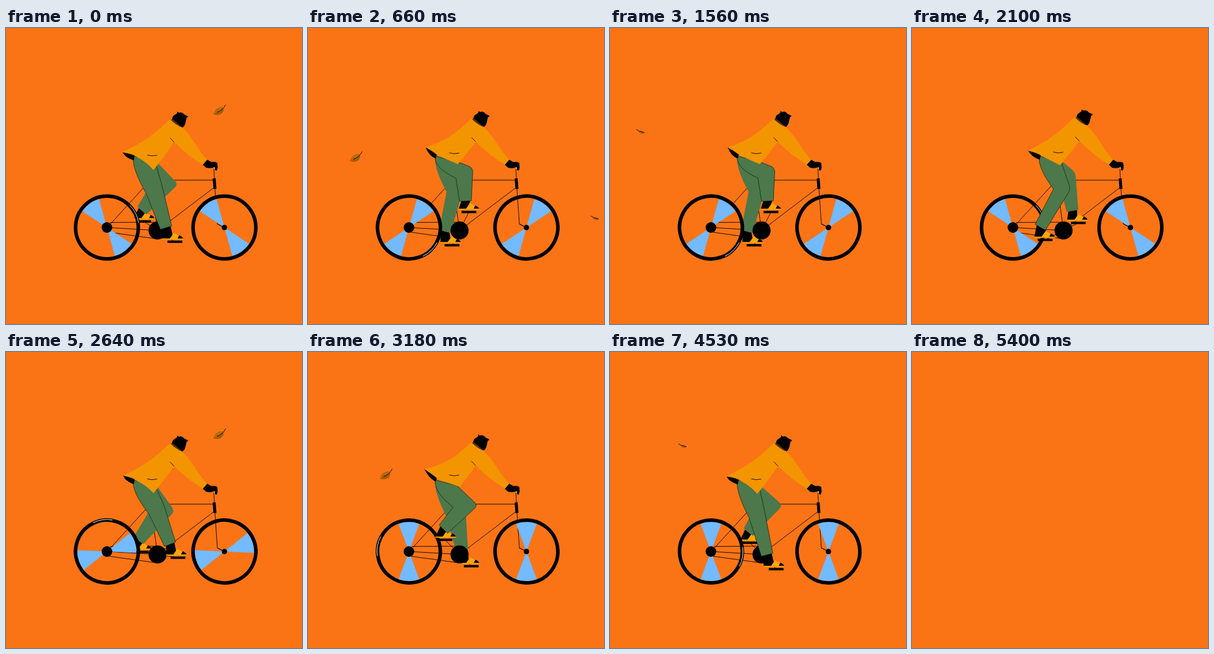
An HTML page that plays this animation: 500 by 500 pixels, repeating every 5430 ms.

```html
<!DOCTYPE html>
<html lang="en">
<head>
<meta charset="utf-8">
<title>Autumn ride</title>
<style>
  html, body { margin: 0; width: 100%; height: 100%; overflow: hidden; background: #fa7416; }
  svg { display: block; width: 100vw; height: 100vh; }
  .line { fill: none; stroke: #000; stroke-width: .9; }
  .pants { fill: #4c784b; }
  .near { stroke: #10180f; stroke-width: .7; }
  .jacket { fill: #f39500; }
  .shoe { fill: #fca50a; }
  .blue { fill: #73baff; }
</style>
</head>
<body>
<svg viewBox="0 0 500 500">
  <defs>
    <g id="wheel">
      <path class="blue" d="M0 0L41.7 27.6A50 50 0 0 1 13.4 48.2ZM0 0L-41.7 -27.6A50 50 0 0 1 -13.4 -48.2Z"/>
      <circle r="53" fill="none" stroke="#000" stroke-width="6"/>
    </g>
    <g id="foot">
      <path class="shoe" d="M-8 -5L-1 -15L8 -10L14 -5Z"/>
      <path d="M5 -5L8 -11Q13 -9 15 -5Z"/>
      <path class="shoe" d="M-20 -5.5H15V-3.5H-20Z"/>
    </g>
  </defs>

  <g id="scene">
    <g id="leafA">
      <path fill="#b96a04" d="M-11 6Q-7 -7 5 -6Q9 -1 3 5Q-3 9 -11 6Z"/>
      <path fill="#a45c00" d="M-11 6Q-1 3 6 -5Q8 0 3 5Q-3 9 -11 6Z"/>
      <path class="line" d="M-5 3Q5 0 10 -10"/>
    </g>
    <g id="leafB">
      <path fill="#b06205" d="M-4 0Q0 -4 7 2Q0 6 -4 0Z"/>
      <path class="line" d="M-7.5 -3.5Q-3 0 6 1.5"/>
    </g>

    <g class="line">
      <path d="M171 337L244 257H353M243 250L256 342L352 269"/>
      <path d="M176 328.5L250 328M171 337L256 342M174 345L250 355.5"/>
      <path d="M351 236L353 272L357 331L369 337"/>
      <path d="M351.6 254L353 272" stroke-width="5"/>
    </g>

    <g id="farLeg"></g>

    <g transform="translate(170.5 337)">
      <g class="spin">
        <use href="#wheel"/>
        <path d="M38.8 -37.5A54 54 0 0 1 53.5 -7.5" fill="none" stroke="#fff" stroke-width=".9"/>
      </g>
      <circle r="9"/>
    </g>
    <g transform="translate(369 337)">
      <g class="spin"><use href="#wheel"/></g>
      <path class="line" d="M-12 -6L0 0"/>
      <circle r="4.6"/>
    </g>
    <circle cx="256" cy="342" r="15.3"/>

    <g id="nearLeg"></g>

    <path id="lining"/>
    <g id="head">
      <path d="M280 155L282 149L289 144L289 141L292 143Q297 141 301 146L308 149.500L305 152L303 161Q301 167 298 168Q289 164 280 155Z"/>
      <path d="M277 155L282 154.500L297 167L293 169Z" fill="#5a3200"/>
    </g>
    <path id="jacket" class="jacket"/>
    <path id="folds" class="line"/>
    <path d="M332.500 231L340 222.500L347 226.500Q353 225 357 228L357.500 236L356 241L353 240L352.500 235Q346 238 338 236Z"/>
    <path class="shoe" d="M350 236L353 235L352.500 240Z"/>
  </g>
</svg>

<script>
const STEP = 30, LOOP = 5430, END = 5400;
const RAD = Math.PI / 180;
const $ = id => document.getElementById(id);
const spins = document.querySelectorAll('.spin');

// Wrapping Catmull-Rom spline through evenly spaced values.
function spline(v, u) {
  const i = Math.floor(u), f = u - i, n = v.length;
  const at = k => v[((i + k) % n + n) % n];
  const [a, b, c, d] = [at(-1), at(0), at(1), at(2)];
  return b + f / 2 * (c - a + f * (2 * a - 5 * b + 4 * c - d + f * (3 * (b - c) + d - a)));
}

// Poses are keyed every 60 degrees of crank angle, from 33 degrees.
const START = 33;
const pose = (v, angle) => spline(v, (angle - START) / 60);
const posePoint = ([xs, ys], angle) => [pose(xs, angle), pose(ys, angle)];

const kneeFront = [[264, 252, 268, 286, 283, 271], [268, 276, 272, 264, 236, 244]];
const kneeBack = [[237, 232, 239, 244, 249, 249], [280, 279, 272, 265, 251, 263]];
const hemBack = [[197, 197, 196, 196, 198, 199], [210, 210, 207, 198, 199, 206]];
const hemFront = [[249, 248, 250, 256, 255, 250], [240, 235, 232, 228, 228, 234]];
const lean = [[0, -1, -2.5, -1.5, -1.5, -.5], [0, -1.5, -3.5, -2, -1.5, -.5]];
const pocket = [214.500, 212, 209.500, 207.500, 209.500, 213];

const pt = p => p.map(n => n.toFixed(2)).join(' ');
const poly = points => 'M' + points.map(pt).join('L') + 'Z';

function toward(p, q, d) {
  const k = d / Math.hypot(q[0] - p[0], q[1] - p[1]);
  return [p[0] + (q[0] - p[0]) * k, p[1] + (q[1] - p[1]) * k];
}

function drawLeg(el, angle, reach, shift, cls) {
  const a = angle * RAD;
  const px = 256 + reach * Math.cos(a), py = 342 + reach * Math.sin(a);
  const ankle = [
    px - 9 - 6.5 * Math.cos(a - 55 * RAD),
    py - 21 - 3.5 * Math.cos(a - 70 * RAD)
  ];
  const front = posePoint(kneeFront, angle), back = posePoint(kneeBack, angle);
  front[0] += shift;
  const dx = ankle[0] - (front[0] + back[0]) / 2;
  const dy = ankle[1] - (front[1] + back[1]) / 2;
  const len = Math.hypot(dx, dy);
  const cuff = w => [ankle[0] + w * dy / len, ankle[1] - w * dx / len];
  const hip = [252 + shift / 2, 226];
  const heel = cuff(-10), shin = cuff(10);
  const footX = px + 1.5 - 2.5 * Math.cos(a - 55 * RAD);

  const leg = `M215 216Q212 236 ${pt(back)}L${pt(heel)}L${pt(shin)}` +
    `L${pt(toward(front, shin, 8))}Q${pt(front)} ${pt(toward(front, hip, 8))}L${pt(hip)}Z`;
  const sock = poly([cuff(-7), cuff(8), [footX - 3, py - 11], [footX - 6, py - 5], [footX - 20, py - 5]]);
  el.innerHTML =
    `<path class="line" d="M256 342L${pt([px, py])}"/>` +
    `<path d="${sock}"/>` +
    `<use href="#foot" x="${footX}" y="${py}"/>` +
    `<path d="M${px - 12.5} ${py - 2}h25v4h-25z"/>` +
    `<path class="pants ${cls}" d="${leg}"/>`;
}

function drawBody(angle) {
  const [lx, ly] = posePoint(lean, angle);
  const back = posePoint(hemBack, angle), front = posePoint(hemFront, angle);
  const collar = [277 + lx, 154 + ly], y = pose(pocket, angle);
  const drop = (back[1] - 197) * .35;

  $('head').setAttribute('transform', `translate(${lx} ${ly})`);
  $('lining').setAttribute('d',
    `M${pt(back)}L218 211L216 ${219 + drop}Q${206 - drop} ${215 + drop} ${pt(back)}Z`);
  $('jacket').setAttribute('d',
    `M${pt(collar)}C${254 + lx} ${176 + ly} ${238 + lx} ${190 + ly / 2} ${pt(back)}` +
    `Q216 ${211 + drop / 2} 220 ${215 + drop / 2}Q238 ${222 + drop} ${pt(front)}` +
    `Q${front[0] + 14} ${front[1] - 17} ${284 + lx / 2} ${193 + ly / 2}` +
    `Q309 217 333 231L340 222.500Q331 214 ${318 + lx / 2} ${193 + ly / 2}` +
    `Q${305 + lx} ${174 + ly} ${297 + lx} ${168 + ly}Q${287 + lx} ${164 + ly} ${pt(collar)}Z`);
  $('folds').setAttribute('d',
    `M${277 + lx / 2} ${185.500 + ly / 2}l7 7.500M238.500 ${y}q8 2.800 17 .3`);
}

function place(el, shown, x, y) {
  el.style.display = shown ? '' : 'none';
  if (shown) el.setAttribute('transform', `translate(${x} ${y})`);
}

// High leaf: even drift to the left while sinking.
function drawLeafA(t) {
  const s = [0, 2640, END].map(o => t - o).find(v => v >= -225 && v <= 725);
  place($('leafA'), s !== undefined, 361 - .4235 * s, 139.5 + .153 * s - 5e-5 * s * s);
}

// Low leaf: lifted from the lower right, then slowing.
const gustX = [635, 560, 485, 413, 322, 226, 140, 93, 52, 8, -35];
const gustY = [375, 350, 321, 285, 243, 195, 161, 162, 175, 182, 186];
function drawLeafB(t) {
  const s = [660, 3885].map(o => t - o).find(v => v >= -65 && v < 1065);
  const u = s / 150 + 2;
  place($('leafB'), s !== undefined, spline(gustX, u), spline(gustY, u));
}

function draw(t) {
  $('scene').style.display = t < END ? '' : 'none';
  if (t >= END) return;
  const angle = START + t * .4;
  spins.forEach(el => el.setAttribute('transform', `rotate(${t * 1.2 % 360})`));
  drawLeg($('farLeg'), angle + 180, 28, 5, '');
  drawLeg($('nearLeg'), angle, 35, 0, 'near');
  drawBody(angle);
  drawLeafA(t);
  drawLeafB(t);
}

const begin = performance.now();
function tick() {
  const t = (performance.now() - begin) % LOOP;
  draw(Math.floor(t / STEP) * STEP);
  requestAnimationFrame(tick);
}
tick();
</script>
</body>
</html>
```
